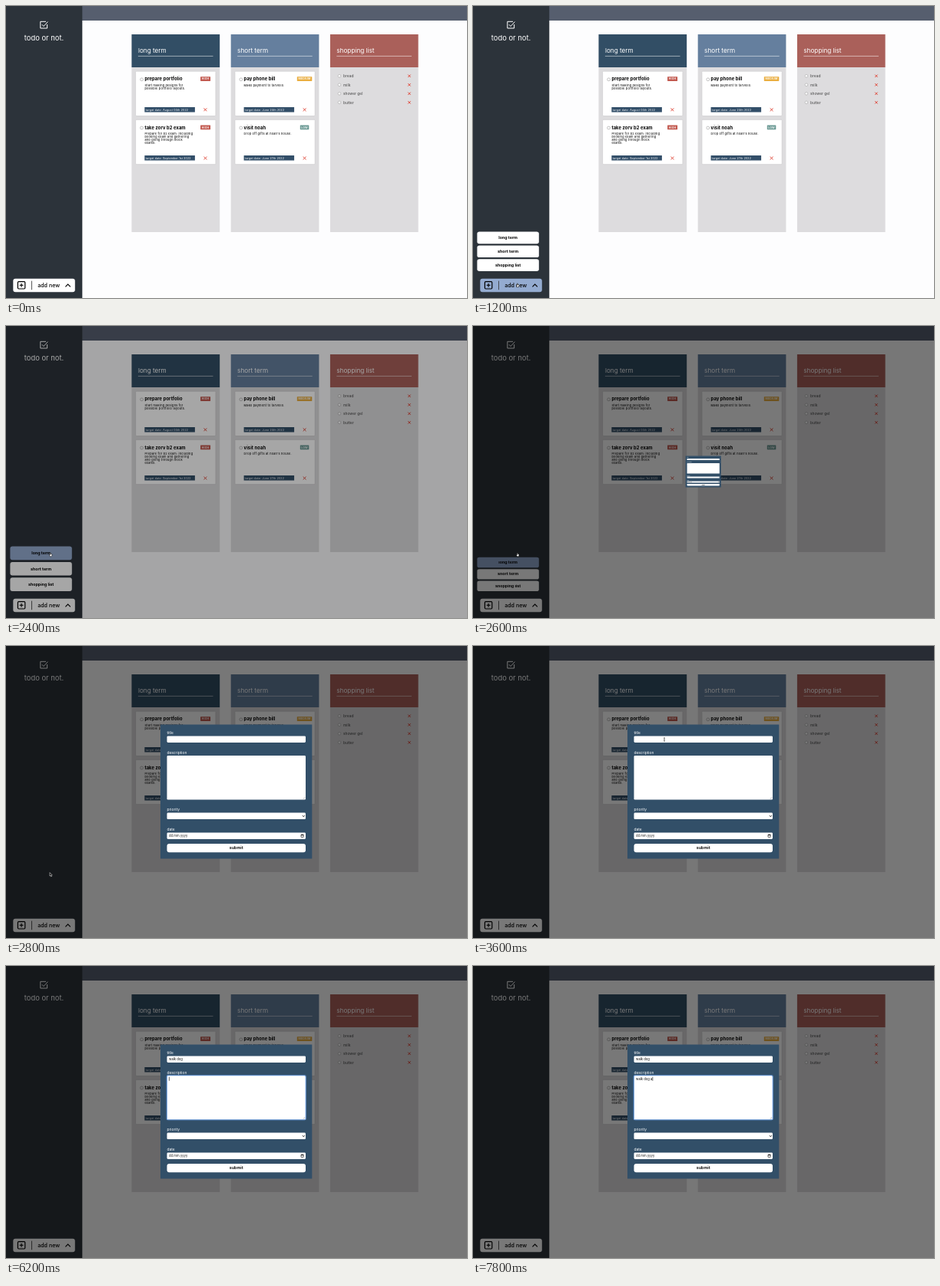
An HTML page with a canvas that plays this animation: 600x381 px, repeating every 8 s.

```html
<!DOCTYPE html>
<html lang="en">
<head>
<meta charset="utf-8">
<title>todo or not.</title>
<style>
html, body { margin: 0; width: 100%; height: 100%; overflow: hidden; background: #fdfdfe; }
canvas { display: block; width: 600px; height: 381px; }
</style>
</head>
<body>
<canvas id="stage"></canvas>
<script>
const canvas = document.getElementById('stage');
const dpr = window.devicePixelRatio || 1;
canvas.width = Math.round(600 * dpr);
canvas.height = Math.round(381 * dpr);
const ctx = canvas.getContext('2d');

const LOOP = 8000, TICK = 200;
const FONT = 'Inter, "Open Sans", sans-serif';
const NAVY = '#324f68', HOVER = '#94abd0', RED = '#e04a3c';

function box(x, y, w, h, fill, r = 0) {
  ctx.fillStyle = fill;
  ctx.beginPath();
  ctx.roundRect(x, y, w, h, r);
  ctx.fill();
}

function text(str, x, y, size, { color = '#fff', weight = 400, gap = 0, align = 'left' } = {}) {
  ctx.font = `${weight} ${size}px ${FONT}`;
  ctx.letterSpacing = gap + 'px';
  ctx.textAlign = align;
  ctx.fillStyle = color;
  ctx.fillText(str, x, y);
  return ctx.measureText(str).width;
}

function line(points, color, width) {
  ctx.strokeStyle = color;
  ctx.lineWidth = width;
  ctx.beginPath();
  points.forEach(([x, y], i) => i ? ctx.lineTo(x, y) : ctx.moveTo(x, y));
  ctx.stroke();
}

function ring(x, y, r, color, width, fill) {
  ctx.beginPath();
  ctx.arc(x, y, r, 0, Math.PI * 2);
  if (fill) { ctx.fillStyle = fill; ctx.fill(); }
  ctx.strokeStyle = color;
  ctx.lineWidth = width;
  ctx.stroke();
}

function cross(x, y, r) {
  line([[x - r, y - r], [x + r, y + r]], RED, 1);
  line([[x + r, y - r], [x - r, y + r]], RED, 1);
}

function outline(x, y, w, h, r, color, width) {
  ctx.strokeStyle = color;
  ctx.lineWidth = width;
  ctx.beginPath();
  ctx.roundRect(x, y, w, h, r);
  ctx.stroke();
}

const columns = [
  { x: 163.5, name: 'long term', color: '#324e65', cards: [
    { title: 'prepare portfolio', tag: 'HIGH', date: 'August 04th 2022',
      lines: ['Start making designs for', 'possible portfolio layouts.'] },
    { title: 'take zorv b2 exam', tag: 'HIGH', date: 'September 1st 2022',
      lines: ['Prepare for b2 exam: including', 'booking exam and gathering', 'and going through mock', 'exams.'] }
  ] },
  { x: 292.7, name: 'short term', color: '#657f9e', cards: [
    { title: 'pay phone bill', tag: 'MEDIUM', date: 'June 24th 2022', lines: ['Make payment to tarvello.'] },
    { title: 'visit noah', tag: 'LOW', date: 'June 27th 2022', lines: ["Drop off gifts at noah's house."] }
  ] },
  { x: 421.9, name: 'shopping list', color: '#aa605a', items: ['bread', 'milk', 'shower gel', 'butter'] }
];
const tags = { HIGH: ['#c2594f', 13], MEDIUM: ['#eaae40', 19.5], LOW: ['#6b9994', 11.5] };

function drawCard(card, x, y) {
  ctx.shadowColor = 'rgba(0,0,0,.15)';
  ctx.shadowBlur = 1.5 * dpr;
  box(x, y, 103.5, 57.5, '#fff', 0.8);
  ctx.shadowColor = 'transparent';
  ring(x + 7.5, y + 10.3, 1.9, '#888', 0.5, '#fff');
  text(card.title, x + 11.3, y + 11.8, 5.8, { color: '#000', weight: 700, gap: 0.1 });
  const [color, w] = tags[card.tag];
  const right = card.tag === 'LOW' ? 96 : card.tag === 'MEDIUM' ? 100 : 97;
  box(x + right - w, y + 6.7, w, 5.8, color, 0.4);
  text(card.tag, x + right - w / 2, y + 10.9, 3.6, { weight: 600, gap: 0.15, align: 'center' });
  card.lines.forEach((s, i) =>
    text(s, x + 11.3, y + 19.3 + i * 4, 3.8, { color: '#222', weight: 500, gap: 0.24 }));
  box(x + 11.3, y + 46.4, 65.5, 6.5, '#334f69');
  text('target date: ' + card.date, x + 12.8, y + 51, 3.5, { gap: 0.18 });
  cross(x + 90.3, y + 49.8, 1.9);
}

function drawColumn({ x, name, color, cards = [], items = [] }) {
  box(x, 80, 114.7, 215, '#dddcde');
  box(x, 37, 114.7, 43, color);
  text(name, x + 8.4, 60.5, 8.2);
  line([[x + 8.4, 65.4], [x + 106, 65.4]], 'rgba(255,255,255,.75)', 0.7);
  cards.forEach((c, i) => drawCard(c, x + 5.6, 85.5 + i * 63.2));
  items.forEach((s, i) => {
    const y = 91.3 + i * 11.5;
    ring(x + 12, y, 1.8, '#999', 0.5, '#fff');
    text(s, x + 17.1, y + 1.8, 4.9, { color: '#444' });
    cross(x + 103, y, 1.7);
  });
}

function drawAddButton(hover) {
  box(9.3, 355.7, 80.5, 17.6, hover ? HOVER : '#fff', 3);
  outline(15.4, 359.6, 9.4, 9.4, 1.2, '#000', 1.2);
  line([[20.1, 361.9], [20.1, 366.7]], '#000', 1.1);
  line([[17.7, 364.3], [22.5, 364.3]], '#000', 1.1);
  line([[33.5, 358.7], [33.5, 370.3]], '#333', 0.8);
  text('add new', 41.2, 367, 7.1, { color: '#000', weight: 500 });
  line([[77.4, 366.3], [80.6, 363], [83.8, 366.3]], '#000', 1.1);
}

function drawMenu(scale, hovered) {
  if (scale <= 0) return;
  ctx.save();
  ctx.translate(0, 346);
  ctx.scale(1, scale);
  columns.forEach(({ name }, i) => {
    const y = -58.4 + i * 20.3;
    box(5.4, y, 80.4, 17.7, i === hovered ? HOVER : '#fff', 3);
    text(name, 45.6, y + 10.7, 5.3, { color: '#000', weight: 700, align: 'center' });
  });
  ctx.restore();
}

function drawPage(s) {
  box(0, 0, 600, 381, '#fdfdfe');
  box(99, 0, 501, 19, '#565e6e');
  box(0, 0, 99.3, 381, '#2c333a');
  line([[53.6, 24], [53.6, 29], [44.8, 29], [44.8, 20.3], [52, 20.3]], '#fff', 1);
  line([[46.8, 24.2], [49, 26.5], [54.4, 20.6]], '#fff', 1);
  text('todo or not.', 49.5, 45.4, 9.4, { align: 'center' });
  columns.forEach(drawColumn);
  drawMenu(s.menu, s.hovered);
  drawAddButton(s.addHover);
}

function drawField(label, y, h, value, focused) {
  text(label, 209.4, y - 2.5, 4.9);
  box(209.5, y, 180.5, h, '#fff', 1.4);
  const w = value ? text(value, 212, y + 5.7, 4.2, { color: '#111' }) : 0;
  if (!focused) return;
  outline(209.3, y - 0.2, 180.9, h + 0.4, 1.6, '#6e9fe0', 1.1);
  line([[212.4 + w, y + 1.8], [212.4 + w, y + 6.8]], '#000', 0.6);
}

function drawModal(s) {
  if (s.modal <= 0) return;
  ctx.save();
  ctx.translate(299.7, 190);
  ctx.scale(s.modal, s.modal);
  ctx.translate(-299.7, -190);
  box(201, 102.5, 197.3, 175, NAVY);
  drawField('title', 117.4, 8.5, s.title, s.focus === 'title');
  drawField('description', 143, 57.6, s.note, s.focus === 'note');
  line([[386.8, 199.4], [389, 197.2]], '#777', 0.4);
  line([[388, 199.4], [389, 198.4]], '#777', 0.4);
  drawField('priority', 217.6, 8.5);
  line([[385.9, 221.2], [387.3, 222.7], [388.7, 221.2]], '#000', 0.9);
  drawField('date', 243.4, 8.5);
  text('dd.mm.yyyy', 212, 249.2, 4.2, { color: '#222' });
  outline(384, 246.2, 3.2, 3.2, 0.3, '#000', 0.6);
  line([[384, 246.6], [387.2, 246.6]], '#000', 0.9);
  box(209.5, 258, 180.5, 11.2, '#fff', 3);
  text('submit', 299.7, 265.4, 5.4, { color: '#000', weight: 600, align: 'center' });
  ctx.restore();
}

function drawPointer(kind, x, y) {
  if (kind === 'beam') {
    line([[x, y - 2], [x, y + 2]], '#222', 0.7);
    line([[x - 1, y - 2.2], [x + 1, y - 2.2]], '#222', 0.5);
    line([[x - 1, y + 2.2], [x + 1, y + 2.2]], '#222', 0.5);
    return;
  }
  const hand = [[-.6, -2], [.3, -2], [.4, -.4], [2, 0], [1.8, 2], [.9, 2.8], [-.7, 2.6], [-1.9, .8], [-.6, .7]];
  const arrow = [[-1, -2.4], [-1, 2.2], [0, 1.3], [.8, 2.9], [1.5, 2.5], [.8, 1], [2.1, .9]];
  const shape = (kind === 'hand' ? hand : arrow).map(([a, b]) => [x + a, y + b]);
  ctx.beginPath();
  shape.forEach(([a, b]) => ctx.lineTo(a, b));
  ctx.closePath();
  ctx.fillStyle = kind === 'hand' ? '#fff' : '#000';
  ctx.fill();
  ctx.strokeStyle = kind === 'hand' ? '#000' : '#fff';
  ctx.lineWidth = 0.5;
  ctx.stroke();
}

// Latest entry of a [time, value] list that has begun.
function at(list, t, first) {
  return list.reduce((v, [start, next]) => t >= start ? next : v, first);
}

const path = [
  [200, ['arrow', 187, 62]], [400, ['hand', 58, 364]], [1800, ['hand', 58, 334]],
  [2000, ['hand', 58, 298]], [2800, ['arrow', 58, 298]], [3000, ['arrow', 78, 280]],
  [3200, ['arrow', 152, 212]], [3400, ['beam', 232, 148]], [3600, ['beam', 249, 122]], [4200, null]
];
const titleKeys = [[4200, 'w'], [4600, 'wa'], [5000, 'walk'], [5200, 'walk d'], [5400, 'walk dog']];
const noteKeys = [[6400, 'w'], [6800, 'wa'], [7000, 'walk'], [7200, 'walk dog'], [7600, 'walk dog '], [7800, 'walk dog a']];
const menuSteps = [[1000, 0.45], [1200, 0.88], [1400, 1], [2600, 0.757], [2800, 0]];

function stateAt(t) {
  return {
    addHover: t >= 400 && t < 1800,
    hovered: at([[1800, 2], [2000, 0]], t, -1),
    menu: at(menuSteps, t, 0),
    dim: at([[2400, 0.35], [2600, 0.53]], t, 0),
    modal: at([[2600, 0.234], [2800, 1]], t, 0),
    focus: at([[3800, 'title'], [5800, 'note']], t, ''),
    title: at(titleKeys, t, ''),
    note: at(noteKeys, t, ''),
    pointer: at(path, t, null),
    click: [800, 2200, 3800].includes(t)
  };
}

function draw(now) {
  const t = Math.floor((now % LOOP) / TICK) * TICK;
  const s = stateAt(t);
  ctx.setTransform(dpr, 0, 0, dpr, 0, 0);
  drawPage(s);
  if (s.dim) box(0, 0, 600, 381, `rgba(0,0,0,${s.dim})`);
  drawModal(s);
  if (s.pointer) {
    const [kind, x, y] = s.pointer;
    if (s.click) ring(x, y - 1.5, 8, '#111', 1);
    drawPointer(kind, x, y);
  }
}

const start = performance.now();
function loop() {
  draw(performance.now() - start);
  requestAnimationFrame(loop);
}
loop();
</script>
</body>
</html>
```
